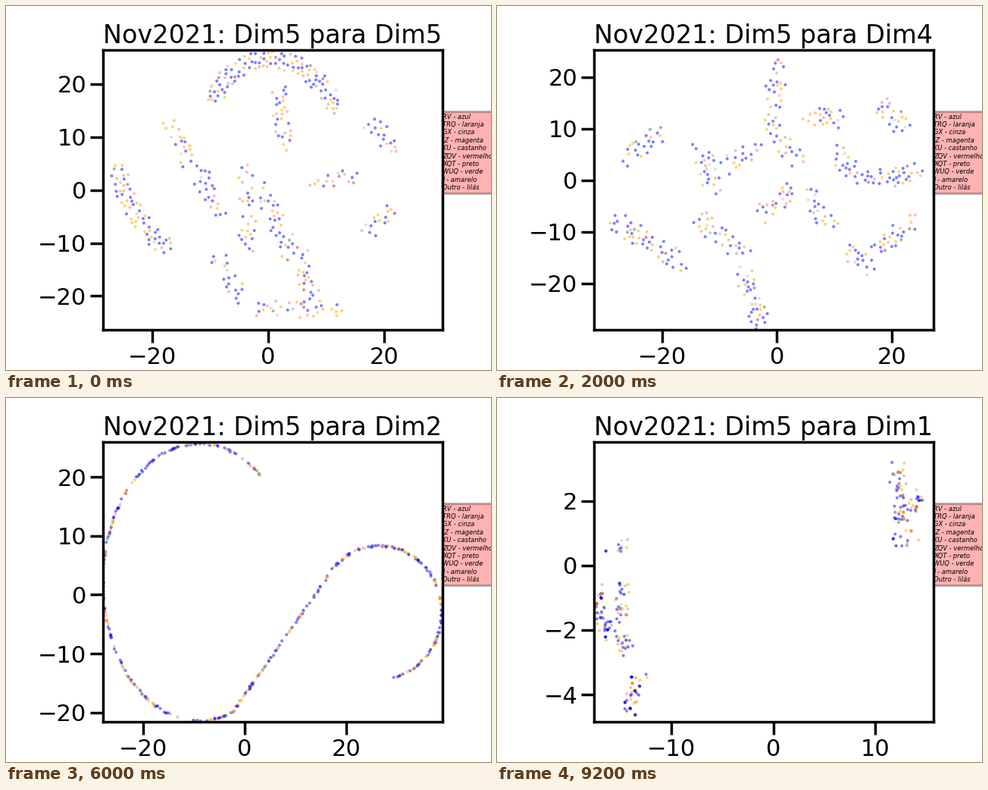
Write a matplotlib script that moves like this. It is 640x480 px and loops after 10 s.

```python
import numpy as np
import matplotlib.pyplot as plt
from matplotlib.animation import FuncAnimation
from matplotlib.ticker import MultipleLocator
from matplotlib.transforms import Affine2D

plt.rcParams.update({
    "font.family": "DejaVu Sans", "axes.linewidth": 2.5, "axes.titlesize": 24,
    "xtick.labelsize": 22, "ytick.labelsize": 22,
    "xtick.major.size": 12, "ytick.major.size": 12,
    "xtick.major.width": 2.5, "ytick.major.width": 2.5,
})

LEGEND = ["RV - azul", "TRQ - laranja", "GX - cinza", "IZ - magenta",
          "KU - castanho", "ZQV - vermelho", "XQT - preto", "WUQ - verde",
          "J - amarelo", "Outro - lilás"]
COLORS = ["blue", "orange", "silver", "salmon", "brown", "rosybrown",
          "forestgreen"]
SHARES = [.5, .29, .06, .05, .03, .05, .02]


def arc(cx, cy, rx, ry, start, end, steps=40):
    """Points on an ellipse, angles in degrees, clockwise on the stage."""
    a = np.radians(np.linspace(start, end, steps))
    return np.column_stack([cx + rx * np.cos(a), cy + ry * np.sin(a)])


def chain(*paths):
    """Join paths end to end and cut them into segments."""
    p = np.vstack(paths)
    return np.stack([p[:-1], p[1:]], axis=1)


def axes_of(*groups):
    """Long axis of each oval group, given by its two end points."""
    return np.array(groups, float).reshape(-1, 2, 2)


def cloud(seed, segs, count, width, gap=0, stacked=0):
    """Scatter points around segments, keeping them at least gap apart."""
    rng = np.random.default_rng(seed)
    a, b = segs[:, 0], segs[:, 1]
    size = np.hypot(*(b - a).T) + width
    size /= size.sum()
    pos = np.empty((0, 2))
    for _ in range(count * 12):
        if len(pos) == count:
            break
        k = rng.choice(len(a), p=size)
        r, turn = width * np.sqrt(rng.random()), rng.uniform(0, 2 * np.pi)
        p = a[k] + rng.random() * (b[k] - a[k])
        p = p + [r * np.cos(turn), r * np.sin(turn)]
        if not len(pos) or np.hypot(*(pos - p).T).min() > gap:
            pos = np.vstack([pos, p])
    if stacked:
        pos = np.vstack([pos, pos[rng.integers(0, 40, stacked)]])
    return pos, rng.choice(COLORS, len(pos), p=SHARES)


disc = np.concatenate([
    chain(arc(350, 195, 95, 125, 215, 330)),
    chain(arc(350, 225, 195, 130, 175, 110, 20))[:12],
    axes_of((358, 110, 370, 185), (215, 152, 245, 212), (250, 212, 285, 275),
            (315, 205, 320, 320), (340, 245, 375, 325), (280, 330, 310, 385),
            (330, 400, 440, 398), (385, 320, 405, 385), (408, 235, 455, 225),
            (480, 155, 520, 190), (475, 300, 515, 265), (148, 215, 157, 250)),
])
branches = axes_of(
    (170, 200, 215, 170), (268, 185, 285, 240), (300, 210, 340, 190),
    (372, 68, 362, 160), (365, 165, 395, 200), (415, 145, 450, 150),
    (500, 125, 535, 160), (450, 195, 480, 225), (480, 230, 560, 220),
    (505, 318, 550, 280), (412, 250, 440, 290), (465, 315, 485, 345),
    (150, 280, 245, 340), (265, 280, 325, 325), (350, 275, 385, 245),
    (325, 345, 345, 415))
islands = np.concatenate([
    chain(arc(170, 260, 32, 36, 60, 290, 12)),
    axes_of((212, 190, 245, 150), (260, 150, 305, 155), (345, 130, 340, 180),
            (300, 195, 395, 188), (370, 220, 335, 265), (265, 235, 290, 260),
            (335, 275, 275, 310), (262, 330, 290, 350), (370, 105, 400, 78),
            (445, 72, 470, 70), (435, 105, 460, 105), (460, 185, 510, 195),
            (400, 235, 490, 225), (520, 210, 542, 255), (405, 272, 470, 275),
            (500, 290, 512, 345), (380, 400, 470, 410), (405, 375, 480, 375),
            (558, 358, 562, 372)),
])
ribbon = chain(arc(255, 243, 127, 183, -50, -290),
               arc(493, 283, 82, 88, 209, 438))
pair = axes_of((150, 200, 172, 196), (135, 245, 136, 290),
               (165, 248, 163, 290), (140, 290, 154, 325),
               (164, 310, 170, 335), (190, 360, 175, 412),
               (528, 88, 532, 160), (542, 155, 558, 128),
               (525, 190, 550, 183))

# points, x limits, y limits, x step, y step
SCENES = [
    (cloud(5, disc, 430, 13, 4.5), (-28.5, 30.07), (-26.4, 26.47), 20, 10),
    (cloud(4, branches, 410, 14, 4.5), (-31.88, 27.26), (-29.08, 25.35), 20, 10),
    (cloud(3, islands, 410, 11, 4.5), (-32.85, 26.5), (-28.4, 30.2), 20, 10),
    (cloud(2, ribbon, 440, 1.3), (-27.95, 39), (-21.6, 26), 20, 10),
    (cloud(1, pair, 190, 11, stacked=110), (-17.6, 15.7), (-4.85, 3.84), 10, 2),
]

fig = plt.figure(figsize=(6.4, 4.8), dpi=100, facecolor="white")
ax = fig.add_axes([.2, .11, .7, .77])
fig.text(.9, .598, "\n".join(LEGEND), fontsize=6, style="italic",
         va="center", zorder=-1,
         bbox=dict(facecolor="red", alpha=.3, pad=1.6, linewidth=2))
stage = (Affine2D().translate(-128, -427.2).scale(1 / 448, -1 / 369.6)
         + ax.transAxes)
dots = ax.scatter([], [], s=8.5, alpha=.5, linewidths=0, transform=stage)


def draw(i):
    (pos, colors), xlim, ylim, xstep, ystep = SCENES[i]
    dots.set_offsets(pos)
    dots.set_facecolor(colors)
    ax.set(xlim=xlim, ylim=ylim, title=f"Nov2021: Dim5 para Dim{5 - i}")
    ax.xaxis.set_major_locator(MultipleLocator(xstep))
    ax.yaxis.set_major_locator(MultipleLocator(ystep))
    return dots,


anim = FuncAnimation(fig, draw, frames=len(SCENES), interval=2000,
                     repeat=True, repeat_delay=0, blit=False)
plt.show()
```
